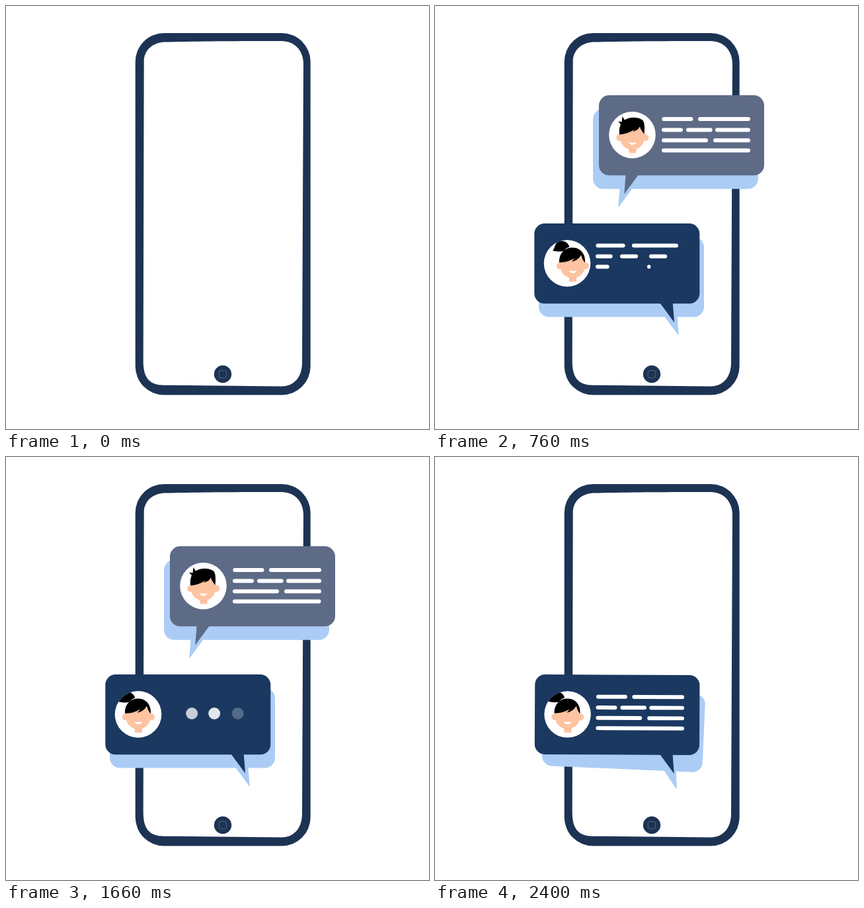
Recreate the animation shown at these times as an HTML page. Size 640 px wide and 640 px high, loop 2.42 s.

```html
<!DOCTYPE html>
<html lang="en">
<head>
<meta charset="utf-8">
<title>Chat on a phone</title>
<style>
  html, body { margin: 0; width: 100%; height: 100%; overflow: hidden; background: #fff; }
  svg { display: block; width: 100vw; height: 100vh; }
</style>
</head>
<body>
<svg id="stage" viewBox="0 0 640 640" xmlns="http://www.w3.org/2000/svg">
  <defs>
    <clipPath id="disc"><circle r="35.3"/></clipPath>
    <g id="skin">
      <g fill="#fec3a1">
        <circle cx="-19.2" cy="4" r="5.1"/>
        <circle cx="19.8" cy="4" r="5.1"/>
        <path d="M-5 17H6V27.5H-5Z"/>
        <path d="M-18.5 -10H18.5V4C18.5 15 10 22.3 0 22.3S-18.5 15 -18.5 4Z"/>
      </g>
      <path d="M-5 22Q.5 24 6 22" fill="none" stroke="#f3b08d" stroke-width=".8"/>
      <path d="M-5.5 11.2Q.3 12.2 6 11.2C5 16.2 -4 16.2 -5.5 11.2Z" fill="#fff"/>
    </g>
    <path id="boy" d="M-19.5 -.5C-20 -7 -19.5 -11 -17.5 -16L-21.5 -20.5L-16 -19.5L-15 -28L-11.5 -22.5C-5.5 -27.5 9.5 -28 16 -22C19.5 -17 18.5 -7 18 -1C15.5 -5 12.5 -8 11.3 -12.5C9.5 -8 5.5 -6 .5 -5L3.5 -8.5C-3.5 -3.5 -11.5 -1 -19.5 -.5Z"/>
    <g id="girl">
      <path d="M-30 -19.5C-27 -22 -27 -29 -23 -32C-15 -37 -6 -32 -4.8 -25C-8 -24 -11 -22 -13 -18.8C-18 -17.3 -25 -18 -30 -19.5Z"/>
      <path d="M-20 -1.5C-20.5 -14 -13 -23.5 -1 -24C13 -24.5 20 -13 19 -1C16 -4 14 -9 13 -12.5C9.5 -7 5 -4 -1 -2.5L3 -8C-4 -3.5 -12 -1.5 -20 -1.5Z"/>
    </g>
  </defs>
  <g id="phone">
    <rect x="195.7" y="41" width="265" height="547.5" rx="43.5" fill="#1d3354"/>
    <path fill="#fff" d="M208.7 84C208.7 67 222 55 240 54.5C300 53.4 340 53 417 53C436 53 450 67 450 87L448 540C448 561 436 575.5 417 575.5L240 573.7C216 573.7 207.7 562 207.7 537Z"/>
    <circle cx="328" cy="557" r="13.2" fill="#1d3354"/>
    <rect x="322.3" y="551.4" width="11.4" height="11.2" rx="3" fill="none" stroke="#60718f" stroke-width=".8"/>
  </g>
</svg>
<script>
const LOOP = 2420, LAG = 525;
const stage = document.getElementById('stage');

// x, width, y of each text bar, in typing order
const BARS = [
  [.4, 47, 0], [55, 79, 0],
  [0, 32, 16.4], [37, 39.7, 16.4], [81, 53, 16.4],
  [0, 70, 32.2], [78, 56, 32.2],
  [0, 134, 47.6]
];

const clamp = x => Math.min(1, Math.max(0, x));
const span = (t, start, length) => clamp((t - start) / length);

// cubic-bezier(.25, .1, .25, 1)
function ease(x) {
  if (x <= 0 || x >= 1) return clamp(x);
  const bez = (a, b, s) => 3 * a * s * (1 - s) ** 2 + 3 * b * s * s * (1 - s) + s ** 3;
  let lo = 0, hi = 1;
  for (let i = 0; i < 24; i++) {
    const mid = (lo + hi) / 2;
    if (bez(.25, .25, mid) < x) lo = mid; else hi = mid;
  }
  return bez(.1, 1, lo);
}

function add(parent, tag, attrs = {}) {
  const el = document.createElementNS('http://www.w3.org/2000/svg', tag);
  for (const key in attrs) el.setAttribute(key, attrs[key]);
  return parent.appendChild(el);
}

function shape(parent, side, fill) {
  const g = add(parent, 'g', { fill });
  add(g, 'rect', { x: -125, y: -60.6, width: 250, height: 121.2, rx: 15.5 });
  add(g, 'path', { d: 'M63.9 58L84.3 58L86.8 89Z', transform: `scale(${side} 1)` });
  return g;
}

function makeBubble(o) {
  const root = add(stage, 'g');
  const shade = shape(root, o.side, '#abccf5');
  const body = add(root, 'g');
  shape(body, o.side, o.fill);

  const avatar = add(body, 'g');
  add(avatar, 'circle', { r: 35.3, fill: '#fff' });
  const face = add(add(avatar, 'g', { 'clip-path': 'url(#disc)' }), 'g');
  add(face, 'use', { href: '#skin' });
  add(face, 'use', { href: o.hair });

  const text = add(body, 'g', { fill: '#fff', transform: `translate(${o.text})` });
  const bars = BARS.map(([x, , y]) => add(text, 'rect', { x, y, height: 6, rx: 3 }));
  const wait = add(body, 'g', { fill: '#fff', transform: `translate(${o.dots})` });
  const dots = [0, 34, 69.5].map(cx => add(wait, 'circle', { cx, r: 9 }));
  return { ...o, shade, body, avatar, face, text, bars, wait, dots };
}

// k = 0 at rest, 1 = tumbled away to nothing
function tumble(el, [x, y], [dx, dy], side, k) {
  el.setAttribute('transform',
    `translate(${x + dx * k} ${y + dy * k}) rotate(${side * 90 * k}) scale(${1 - k})`);
}

// a dot flashes up quickly and fades more slowly, every 130 ms
function glow(t, i) {
  const d = (((t - 1115 - 25 * i + 30) % 130) + 130) % 130;
  const v = d < 30 ? d / 30 : 1 - (d - 30) / 60;
  return .25 + .75 * clamp(v);
}

function pose(b, t) {
  const out = span(t, 1836, 271) ** 3;
  const k = Math.max(1 - ease(span(t, 25, 200)), out);
  const ks = Math.max(1 - ease(span(t, 10, 180)), span(t, 1808, 222) ** 3);
  tumble(b.shade, b.shadeAt, b.shadeGo, b.side, ks);
  tumble(b.body, b.at, b.go, b.side, k);

  const slide = 70 * (1 - ease(span(t, 97, 230)));
  b.avatar.setAttribute('transform', `translate(${b.pic}) scale(${1 + .48 * out})`);
  b.face.setAttribute('transform', `translate(${slide} 0) rotate(${b.side * 120 * out})`);

  const waiting = t >= 1000 && t < 1271;
  b.wait.setAttribute('visibility', waiting ? 'visible' : 'hidden');
  b.text.setAttribute('visibility', waiting ? 'hidden' : 'visible');
  b.text.setAttribute('opacity', 1 - .6 * out);
  b.dots.forEach((dot, i) => dot.setAttribute('opacity', glow(t, i)));

  const start = t < 1000 ? 67 : 1271;
  b.bars.forEach((bar, i) =>
    bar.setAttribute('width', BARS[i][1] * ease(span(t, start + 24 * i, 240))));
}

const lower = makeBubble({
  side: 1, fill: '#1a3860', hair: '#girl',
  at: [275.3, 389.7], go: [110, 110], shadeAt: [282, 410], shadeGo: [120, 115],
  pic: '-75.3 -.3', text: '-32.3 -30.3', dots: '5.9 -1.7'
});
const upper = makeBubble({
  side: -1, fill: '#5e6b87', hair: '#boy',
  at: [373, 195.7], go: [-16, 273], shadeAt: [364, 216.2], shadeGo: [-2.5, 260],
  pic: '-74.5 -.6', text: '-30 -27.7', dots: '2 -1.9'
});

let begin;
function draw(now) {
  begin ??= now;
  const t = (now - begin) % LOOP;
  pose(upper, t);
  pose(lower, t - LAG);
  requestAnimationFrame(draw);
}
requestAnimationFrame(draw);
</script>
</body>
</html>
```
